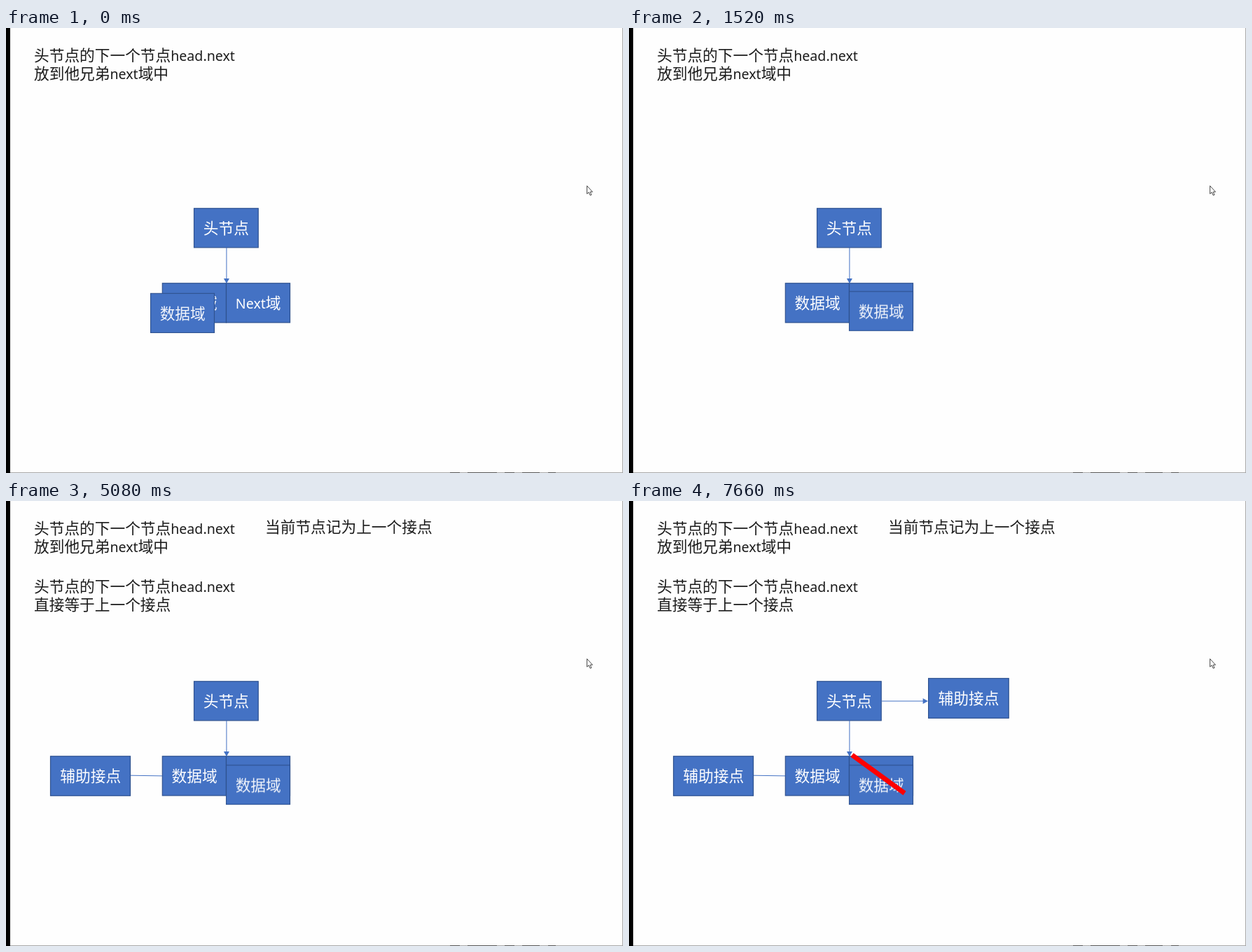
Write an HTML page that moves like this. It is 881 px wide and 636 px high and loops after 8 s.

```html
<!DOCTYPE html>
<html lang="zh-CN">
<head>
<meta charset="utf-8">
<title>链表反转</title>
<style>
  html, body { margin: 0; width: 100%; height: 100%; overflow: hidden; background: #fefefe; }
  svg { display: block; width: 881px; height: 636px; }
  text {
    font: 300 21.7px "Noto Sans CJK SC", "Noto Sans CJK", sans-serif;
    fill: #1c1c1c;
  }
  .en { font: 300 19.6px "Noto Sans", "Open Sans", sans-serif; }
  .box rect { fill: #4472c4; stroke: #2f528f; stroke-width: 1.2; }
  .box text { fill: #fff; text-anchor: middle; }
  .arrow line { stroke: #4472c4; stroke-width: 1; }
  .arrow path { fill: #4472c4; }

  .show, .copy, .cursor { animation: 8s step-end infinite; }
  .copy { animation-name: move; }
  .copy text { fill: #f2f5fb; }
  .cursor { animation-name: nudge; }
  .note { animation-name: note; }
  .left { animation-name: left; }
  .aux { animation-name: aux; }
  .label { animation-name: label; }
  .right { animation-name: right; }
  .aux2 { animation-name: aux2; }
  .strike { animation-name: strike; }

  @keyframes move {
    0% { transform: translate(206.5px, 379.3px); }
    6.25% { transform: translate(225px, 431.7px); }
    12.5% { transform: translate(312.5px, 418.8px); }
    19% { transform: translate(314.5px, 376.5px); }
    25.25%, to { transform: translate(314.5px, 377.5px); }
  }
  @keyframes nudge {
    0%, 63.5%, to { transform: none; }
    57.25% { transform: translate(-6px, -6px); }
  }
  @keyframes note { 0% { opacity: 0; } 25.25%, to { opacity: 1; } }
  @keyframes left { 0% { opacity: 0; } 38.125%, to { opacity: 1; } }
  @keyframes aux { 0% { opacity: 0; } 51%, to { opacity: 1; } }
  @keyframes label { 0% { opacity: 0; } 63.5%, to { opacity: 1; } }
  @keyframes right { 0% { opacity: 0; } 76.375%, to { opacity: 1; } }
  @keyframes aux2 { 0% { opacity: 0; } 82.875%, to { opacity: 1; } }
  @keyframes strike { 0% { opacity: 0; } 95.75%, to { opacity: 1; } }
</style>
</head>
<body>
<svg viewBox="0 0 881 636">
  <!-- window edges -->
  <rect width="6" height="636"/>
  <path d="M6 635.5H881M880.5 0V636" stroke="#a8a8a8"/>
  <path d="M634 635.5h14m11 0h42m11 0h14m11 0h25m12 0h11" stroke="#555"/>

  <text x="40" y="47">头节点的下一个节点<tspan class="en">head.next</tspan></text>
  <text x="40" y="73">放到他兄弟<tspan class="en">next</tspan>域中</text>
  <g class="show note">
    <text x="40" y="129.5">头节点的下一个节点<tspan class="en">head.next</tspan></text>
    <text x="40" y="155.5">直接等于上一个接点</text>
  </g>
  <text class="show label" x="370" y="45">当前节点记为上一个接点</text>

  <g class="box" transform="translate(268.5 257.8)">
    <rect width="91.7" height="56"/><text x="45.8" y="36.3">头节点</text>
  </g>
  <g class="box" transform="translate(223.3 364.8)">
    <rect width="91.2" height="56.2"/><text x="45.8" y="36.5">数据域</text>
  </g>
  <g class="box" transform="translate(314.5 364.8)">
    <rect width="91" height="56.2"/><text x="45.7" y="36.5"><tspan class="en">Next</tspan>域</text>
  </g>

  <g class="arrow"><line x1="314.9" y1="314" x2="314.9" y2="360"/><path d="M310.9 358h8l-4 7.2z"/></g>
  <g class="arrow show left"><line x1="223" y1="392.9" x2="171" y2="392.1"/><path d="M165.2 392l7.3-3.8v7.6z"/></g>
  <g class="arrow show right"><line x1="361" y1="286" x2="421" y2="286"/><path d="M427 286l-7.4-3.9v7.8z"/></g>

  <g class="box copy">
    <rect width="91" height="56.2"/><text x="45.7" y="36.3">数据域</text>
  </g>
  <g class="show aux"><g class="box" transform="translate(63.5 364.8)">
    <rect width="114" height="56.4"/><text x="57.2" y="36.5">辅助接点</text>
  </g></g>
  <g class="show aux2"><g class="box" transform="translate(427.6 253.5)">
    <rect width="114.6" height="56.8"/><text x="57.4" y="36.7">辅助接点</text>
  </g></g>

  <line class="show strike" x1="318.5" y1="363" x2="393.5" y2="417.7" stroke="#f00" stroke-width="7"/>

  <path class="cursor" d="M829.6 225.6V237l2.6-2.2 2 4.4 1.8-.8-1.9-4.2h3.4z" fill="#fff" stroke="#333" stroke-width=".9"/>
</svg>
</body>
</html>
```
